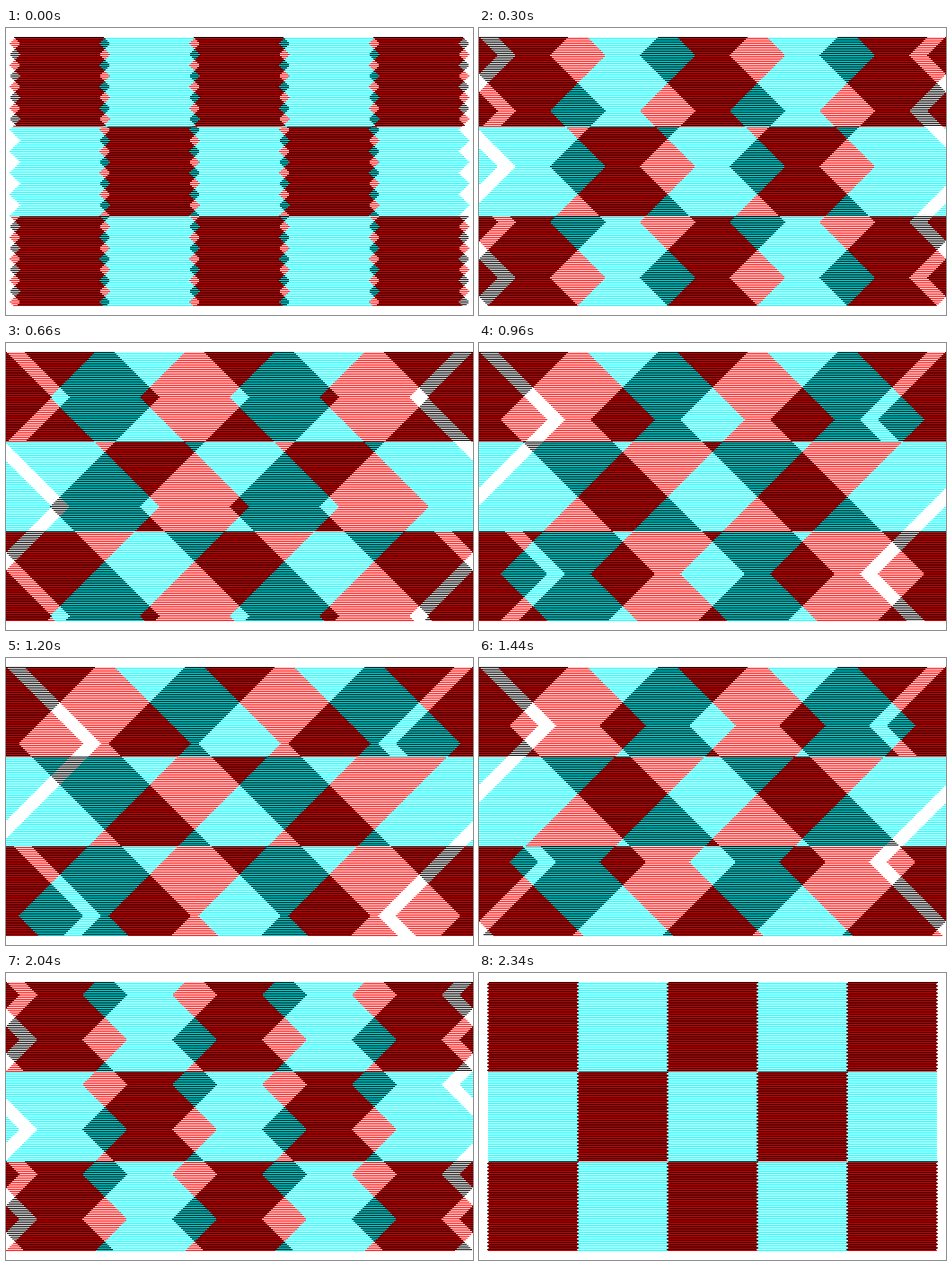
An HTML page with a canvas for the animation above (2.4 s loop, 520 by 320 pixels).

```html
<!DOCTYPE html>
<html lang="en">
<head>
<meta charset="utf-8">
<title>Woven checkerboard</title>
<style>
  html, body { margin: 0; width: 100%; height: 100%; overflow: hidden; background: #fff; }
  canvas { display: block; }
</style>
</head>
<body>
<canvas id="stage" width="520" height="320"></canvas>
<script>
const WIDTH = 520, HEIGHT = 320;
const MARGIN = 10, CELL = 100, COLS = 5, ROWS = 3;
const STEPS = 40, STEP_MS = 60, MAX_REACH = 100;

// Two interleaved sets of rows slide in opposite directions.
const EVEN = { dark: '#000', light: '#fff' };
const ODD = { dark: '#f00', light: '#0ff' };

const ctx = document.getElementById('stage').getContext('2d', { alpha: false });

// Row offsets bounce between -reach and +reach down the stage. The reach swells
// and shrinks; the bounce direction carries over from one step to the next.
function buildSteps() {
  const steps = [];
  let level = 0, growth = 0.05, direction = 1;
  while (steps.length < STEPS) {
    level += growth;
    if (level >= 1 || level <= 0) growth = -growth;
    const reach = Math.trunc(level * MAX_REACH);
    const offsets = [];
    for (let y = 0, offset = 0; y < HEIGHT; y++) {
      offset += direction;
      if (Math.abs(offset) > reach) direction = -direction;
      offsets.push(y % 2 ? offset : -offset);
    }
    steps.push(offsets);
  }
  return steps;
}

function drawRow(y, offset) {
  const tones = y % 2 ? ODD : EVEN;
  const row = Math.floor((y - MARGIN) / CELL);
  for (let col = 0; col < COLS; col++) {
    ctx.fillStyle = (row + col) % 2 ? tones.light : tones.dark;
    const x = MARGIN + col * CELL + offset;
    for (const wrap of [-WIDTH, 0, WIDTH]) ctx.fillRect(x + wrap, y, CELL, 1);
  }
}

function draw(offsets) {
  ctx.fillStyle = '#fff';
  ctx.fillRect(0, 0, WIDTH, HEIGHT);
  for (let y = MARGIN; y < MARGIN + ROWS * CELL; y++) drawRow(y, offsets[y]);
}

const steps = buildSteps();
let shown = -1;
let start = null;
function tick(now) {
  if (start === null) start = now;
  const step = Math.floor((now - start) / STEP_MS) % STEPS;
  if (step !== shown) draw(steps[shown = step]);
  requestAnimationFrame(tick);
}
draw(steps[0]);
requestAnimationFrame(tick);
</script>
</body>
</html>
```
